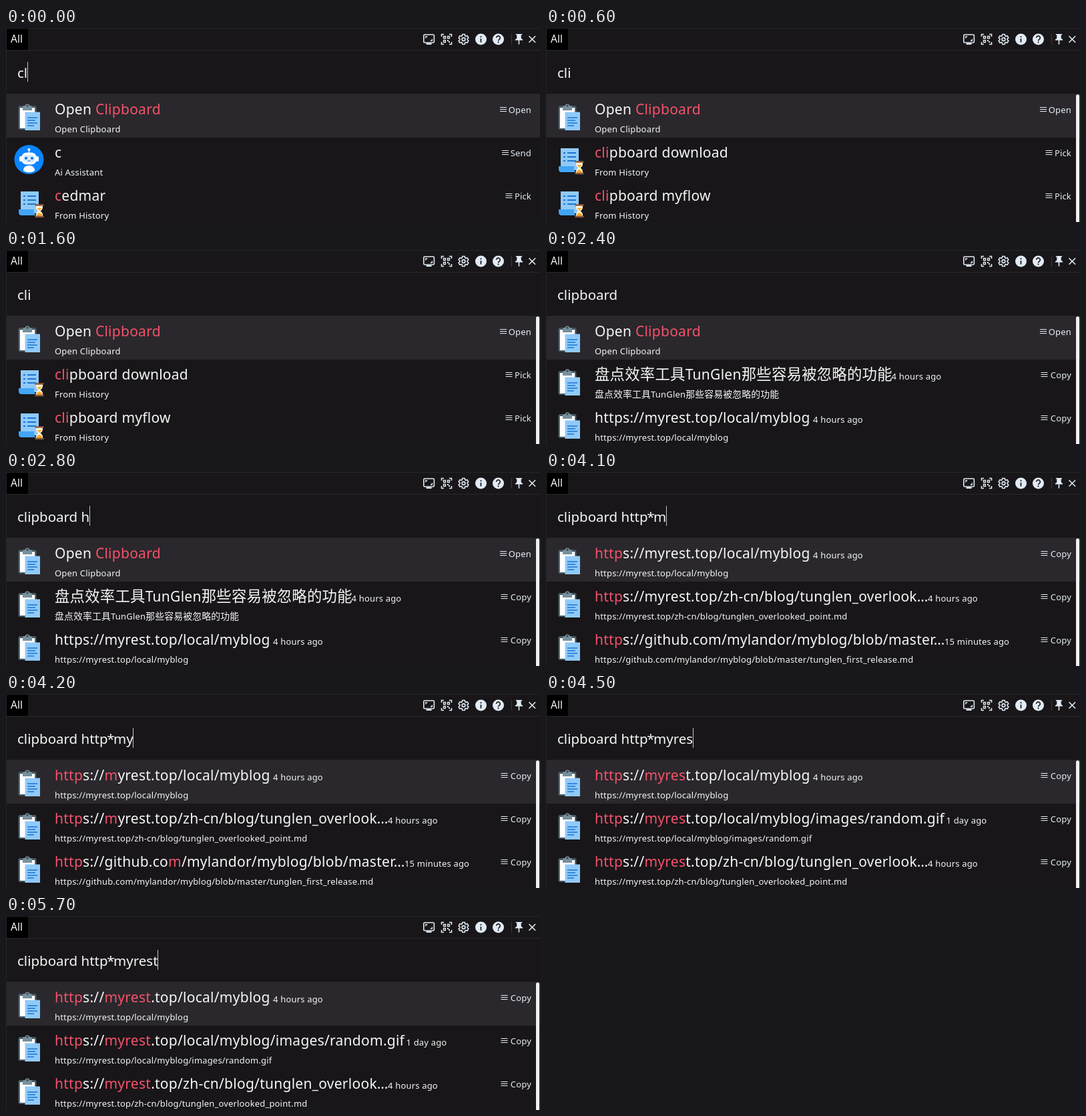
Animation, 800 px wide and 292 px high, one loop 6000 ms. Source, as an HTML page:

```html
<!DOCTYPE html>
<html lang="en">
<head>
<meta charset="utf-8">
<title>Launcher search</title>
<style>
  html, body { margin: 0; width: 100%; height: 100%; overflow: hidden; background: #181619; }
  svg { display: block; width: 800px; height: 292px; }
  text { font-family: "Noto Sans", "Noto Sans CJK SC", "Noto Sans CJK", "Open Sans", sans-serif; fill: #f6f6f6; white-space: pre; }
  .query { font-size: 20.5px; }
  .title { font-size: 21px; letter-spacing: .26px; }
  .small { font-size: 13px; letter-spacing: .18px; }
  .action { fill: #e6edf5; }
  .cjk { font-family: "Noto Sans CJK SC", "Noto Sans CJK", sans-serif; font-size: 1.065em; }
  .hit { fill: #f4526c; }
  .tools { fill: none; stroke: #e1ebf5; stroke-width: 1.6; }
  .solid { fill: #e1ebf5; stroke: none; }
</style>
</head>
<body>
<svg viewBox="0 0 800 292" xmlns="http://www.w3.org/2000/svg">
  <defs>
    <g id="clipboard">
      <rect x="18.5" y="17" width="27" height="36" rx="2.5" fill="#455a64"/>
      <rect x="20.8" y="20" width="22.4" height="31" fill="#fff"/>
      <path d="M25 24v-5q0-2 2-2h1.5a3.6 3.6 0 0 1 7 0H37q2 0 2 2v5z" fill="#78909c"/>
      <circle cx="32" cy="17" r="1.6" fill="#37474f"/>
      <path d="M28.5 26.5H51V54H28.5z" fill="#90caf9"/>
      <path d="M32 35h15M32 39h12M32 43h15M32 47h10" stroke="#1976d2" stroke-width="1.5"/>
    </g>
    <g id="robot">
      <circle cx="34.5" cy="33" r="22" fill="#0a84ff"/>
      <g fill="#fff">
        <circle cx="34.5" cy="18" r="2"/>
        <path d="M33.8 18h1.4v6h-1.4z"/>
        <rect x="20" y="28" width="4" height="8" rx="2"/>
        <rect x="45" y="28" width="4" height="8" rx="2"/>
        <rect x="23" y="22.5" width="23" height="18" rx="8"/>
        <path d="M26 50q0-8 8.5-8t8.5 8q-8.5 5-17 0z"/>
      </g>
      <rect x="25.5" y="26" width="18" height="11" rx="5.5" fill="#d4e9ff"/>
      <circle cx="30" cy="31" r="2" fill="#0a6fe0"/>
      <circle cx="39" cy="31" r="2" fill="#0a6fe0"/>
      <path d="M32.5 34.5q2 1.5 4 0" fill="none" stroke="#0a6fe0"/>
    </g>
    <g id="history">
      <path d="M22 16h27v33H22z" fill="#90caf9"/>
      <path d="M19 43h23v4q0 4 4 5H23q-4 0-4-5z" fill="#42a5f5"/>
      <path d="M26 23h3M26 29h3M26 35h3M32 23h13M32 29h13M32 35h13" stroke="#1976d2" stroke-width="2"/>
      <path d="M45 37h10v3q0 3-3.5 5.5 3.5 2.5 3.5 5.5v3H45v-3q0-3 3.5-5.5Q45 43 45 40z" fill="#fff3d6"/>
      <path d="M46.5 41h7l-3.5 4zM46 53q0-4 4-5 4 1 4 5z" fill="#ffa726"/>
      <path d="M43.5 36.5h13M43.5 54h13" stroke="#8d5a3c" stroke-width="2.4"/>
    </g>
  </defs>

  <rect width="800" height="292" fill="#181619"/>
  <path d="M.5 292V.5H800" fill="none" stroke="#262528"/>
  <path d="M1 33.5H800" stroke="#28272a"/>
  <rect x="1" y="1" width="32" height="32" fill="#000"/>
  <text x="7" y="22" font-size="15.5">All</text>

  <g class="tools">
    <rect x="625.8" y="10" width="15.6" height="12" rx="1.5"/>
    <path d="M628.8 15.5V13h2.5M638.4 16.5V19h-2.5" stroke-width="1.3"/>
    <path d="M629.6 24h8" stroke-width="2"/>
    <path d="M652.5 13V9.5H656M664 9.5h3.5V13M667.5 21v3.5H664M656 24.5h-3.5V21"/>
    <path d="M655.5 12.5h3v3h-3zM661.5 12.5h3v3h-3zM655.5 18.5h3v3h-3z" stroke-width="1.3"/>
    <path d="M661 18h2v2h2v2h-2v-2h-2z" class="solid"/>
    <path id="gear" stroke-linejoin="round"/>
    <circle cx="685.5" cy="17" r="2.4"/>
    <circle cx="711.5" cy="17" r="8.5" class="solid"/>
    <path d="M711.5 16v5.5M711.5 12.3v2" stroke="#181619" stroke-width="1.8"/>
    <circle cx="737.5" cy="17" r="8.5" class="solid"/>
    <path d="M734.7 14.8a2.8 2.8 0 1 1 4.6 2.1q-1.8 1.2-1.8 2.4M737.5 20.6v1.8" stroke="#181619" stroke-width="1.7"/>
    <path d="M757.5 9v16" stroke="#3c3b3f" stroke-width="1"/>
    <path class="solid" transform="translate(758.9 7.4) scale(.8)" d="M16 9V4h1c.55 0 1-.45 1-1s-.45-1-1-1H7c-.55 0-1 .45-1 1s.45 1 1 1h1v5c0 1.66-1.34 3-3 3v2h5.97v7l1 1 1-1v-7H19v-2c-1.66 0-3-1.34-3-3z"/>
    <path d="M783.5 12.2l9.6 9.6M793.1 12.2l-9.6 9.6"/>
  </g>

  <text id="query" class="query" x="17" y="75"></text>
  <rect id="caret" y="51" width="1" height="30" fill="#c4c4c4"/>
  <rect x="1" y="99" width="799" height="66" fill="#2a282c"/>
  <g id="rows"></g>
  <rect id="bar" x="794" y="100" width="5" height="200" rx="2.5" fill="#f1f1f1"/>
</svg>

<script>
const $ = id => document.getElementById(id);

const LOOP = 6000;
const ROW = 65;
const MENU_X = { Open: 740, Send: 743, Pick: 748.5, Copy: 741.5 };

const row = (icon, action, title, sub, hits, age, ageX) =>
  ({ icon, action, title, sub, hits, age, ageX });
const copied = (title, sub, age, ageX) => row("clipboard", "Copy", title, sub, null, age, ageX);
const picked = (title, hit) => row("history", "Pick", title, "From History", [hit]);

const open = row("clipboard", "Open", "Open Clipboard", "Open Clipboard", ["Clipboard"]);
const site = "https://myrest.top/";
const note = "盘点效率工具TunGlen那些容易被忽略的功能";
const blog = site + "local/myblog";
const random = blog + "/images/random.gif";
const repo = "https://github.com/mylandor/myblog/blob/master";

const blogRow = copied(blog, blog, "4 hours ago", 400);
const postRow = copied(site + "zh-cn/blog/tunglen_overlook…",
  site + "zh-cn/blog/tunglen_overlooked_point.md", "4 hours ago", 572);
const repoRow = copied(repo + "…", repo + "/tunglen_first_release.md", "15 minutes ago", 597);

const lists = {
  start: [open, row("robot", "Send", "c", "Ai Assistant", []), picked("cedmar", "c")],
  cli: [open, picked("clipboard download", "cli"), picked("clipboard myflow", "cli")],
  recent: [open, copied(note, note, "4 hours ago", 517.5), blogRow],
  http: [blogRow, postRow, repoRow],
  myrest: [blogRow, copied(random, random, "1 day ago", 599.5), postRow]
};

// time, query, caret shown, list, highlighted terms
const steps = [
  [0, "cl", 1, "start"],
  [100, "cli", 1, "start"],
  [400, "cli", 1, "cli"],
  [600, "cli", 0, "cli"],
  [1100, "cli", 1, "cli"],
  [1600, "cli", 0, "cli"],
  [1900, "clipboard ", 1, "cli"],
  [2000, "clipboard ", 1, "recent"],
  [2400, "clipboard ", 0, "recent"],
  [2800, "clipboard h", 1, "recent"],
  [2900, "clipboard ht", 1, "http", "h"],
  [3000, "clipboard htt", 1, "http", "ht"],
  [3100, "clipboard http", 1, "http", "htt"],
  [3200, "clipboard http", 1, "http", "http"],
  [3600, "clipboard http", 0, "http", "http"],
  [3700, "clipboard http*", 1, "http", "http"],
  [3800, "clipboard http*", 1, "http", "ht"],
  [3900, "clipboard http*", 1, "http", "http"],
  [4100, "clipboard http*m", 1, "http", "http"],
  [4200, "clipboard http*my", 1, "http", "http m"],
  [4300, "clipboard http*myr", 1, "http", "http my"],
  [4400, "clipboard http*myre", 1, "myrest", "http myre"],
  [4500, "clipboard http*myres", 1, "myrest", "http myres"],
  [4600, "clipboard http*myrest", 1, "myrest", "http myres"],
  [4800, "clipboard http*myrest", 1, "myrest", "http myrest"],
  [5200, "clipboard http*myrest", 0, "myrest", "http myrest"],
  [5700, "clipboard http*myrest", 1, "myrest", "http myrest"]
];

const cjk = s => s.replace(/[\u4e00-\u9fff]+/g, '<tspan class="cjk">$&</tspan>');

// Marks each term once, searching from the end of the previous one.
function mark(s, terms) {
  let out = "", from = 0;
  for (const term of terms) {
    const at = s.indexOf(term, from);
    if (at < 0) continue;
    out += cjk(s.slice(from, at)) + `<tspan class="hit">${term}</tspan>`;
    from = at + term.length;
  }
  return out + cjk(s.slice(from));
}

function rowMarkup(r, i, terms) {
  const x = MENU_X[r.action];
  const age = r.age ? `<text class="small" x="${r.ageX}" y="130">${r.age}</text>` : "";
  return `<g transform="translate(0 ${i * ROW})">
    <use href="#${r.icon}" y="100"/>
    <text class="title" x="73" y="130">${mark(r.title, r.hits || terms)}</text>${age}
    <text class="small" x="73" y="157">${cjk(r.sub)}</text>
    <path d="M${x} 119.5h10m-10 3h10m-10 3h10" stroke="#e6edf5"/>
    <text class="small action" x="787" y="127.5" text-anchor="end">${r.action}</text>
  </g>`;
}

function show([, query, caret, list, hits = ""]) {
  const [head, tail] = query.split("*");
  $("query").innerHTML = tail === undefined ? head :
    `${head}<tspan dx="-1.4">*</tspan>` + (tail && `<tspan dx="-1.4">${tail}</tspan>`);
  const end = $("query").getEndPositionOfChar(query.length - 1).x;
  $("caret").setAttribute("x", Math.round(end - .3));
  $("caret").style.display = caret ? "" : "none";
  $("bar").style.display = list === "start" ? "none" : "";
  const terms = hits.split(" ").filter(Boolean);
  $("rows").innerHTML = lists[list].map((r, i) => rowMarkup(r, i, terms)).join("");
}

function gearPath(cx, cy) {
  const points = [];
  for (let tooth = 0; tooth < 6; tooth++) {
    for (const [turn, r] of [[-22, 5.7], [-14, 7.7], [14, 7.7], [22, 5.7]]) {
      const a = (tooth * 60 - 90 + turn) * Math.PI / 180;
      points.push((cx + r * Math.cos(a)).toFixed(2) + " " + (cy + r * Math.sin(a)).toFixed(2));
    }
  }
  return "M" + points.join("L") + "z";
}

$("gear").setAttribute("d", gearPath(685.5, 17));

const began = performance.now();
let current;

function tick() {
  const t = (performance.now() - began) % LOOP;
  const step = steps.findLast(s => s[0] <= t);
  if (step !== current) show(current = step);
  requestAnimationFrame(tick);
}
tick();
</script>
</body>
</html>
```
